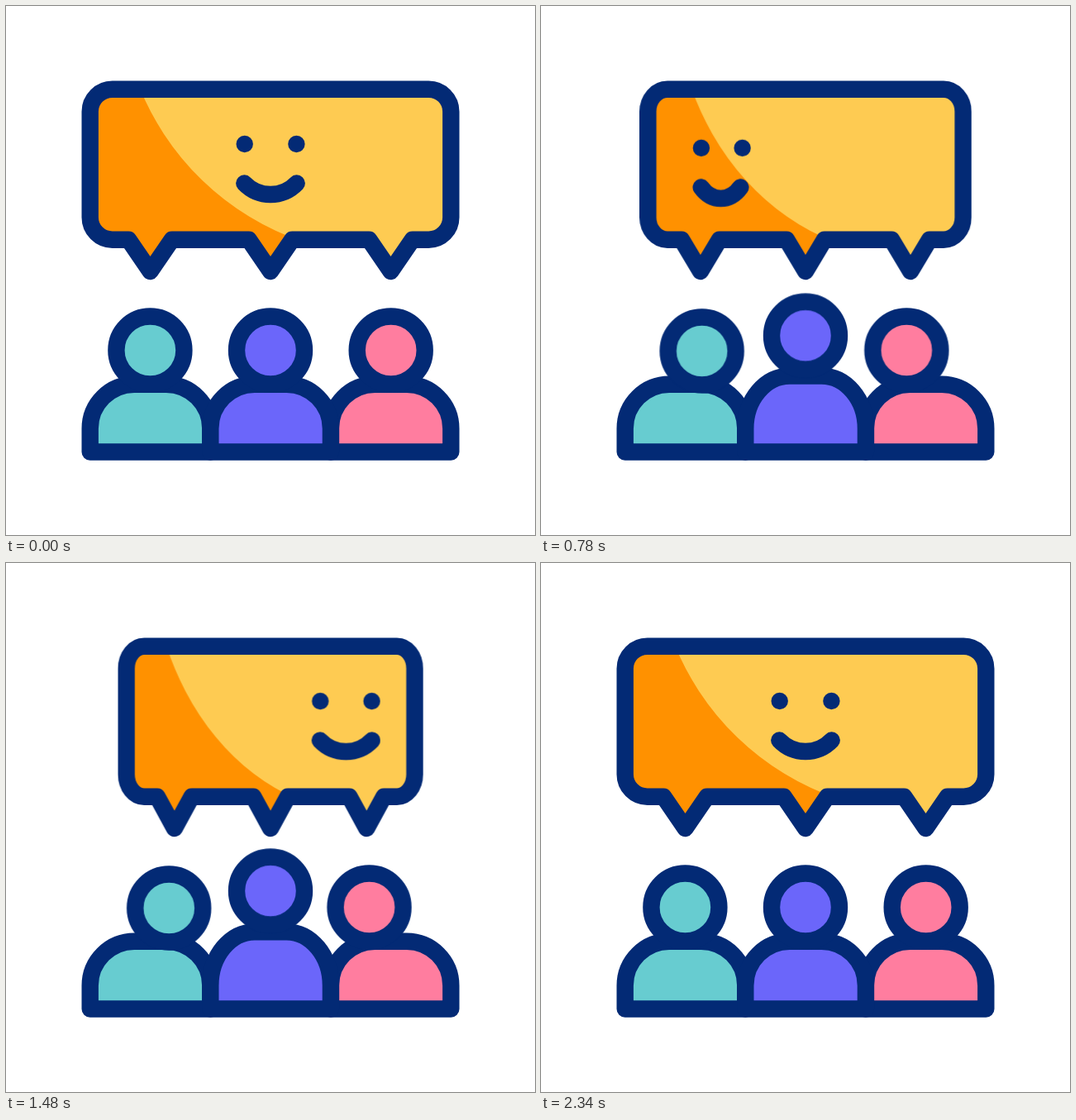
These frames come from a looping animation (640 px wide and 640 px high, 2400 ms). An HTML page:

```html
<!DOCTYPE html>
<html lang="en">
<head>
<meta charset="utf-8">
<title>Shared mood</title>
<style>
  html, body { margin: 0; width: 100%; height: 100%; overflow: hidden; background: #fff; }
  svg { display: block; width: 640px; height: 640px; }

  path, circle { vector-effect: non-scaling-stroke; }
  .line { stroke: #032a75; stroke-width: 20.4px; stroke-linecap: round; stroke-linejoin: round; }

  .bubble, .eyes, .smile, .head, .mid { animation: 2400ms infinite both; }
  .bubble, .eyes, .smile { transform-origin: 320px 0; }

  .bubble { animation-name: squeeze; }
  .eyes { animation-name: look; --dx: -110.7px; --sx: .783; }
  .smile { animation-name: look; --dx: -112px; --sx: .74; }
  .head { animation-name: lean; }
  .mid { animation-name: stretch; }

  @keyframes squeeze {
    0%, 6.46% { transform: scaleX(1); animation-timing-function: cubic-bezier(.5, 0, .767, 1); }
    48.96% { transform: scaleX(.757); animation-timing-function: cubic-bezier(.35, 0, .61, 1); }
    97.5%, 100% { transform: scaleX(1); }
  }
  @keyframes look {
    0% { transform: translate(0, 0) scaleX(1); animation-timing-function: cubic-bezier(.333, 0, .571, 1); }
    24.375% { transform: translate(var(--dx), 5px) scaleX(var(--sx)); animation-timing-function: cubic-bezier(.57, 0, .7, 1); }
    65.46% { transform: translate(98px, 0) scaleX(1); animation-timing-function: cubic-bezier(.333, 0, .667, 1); }
    97.5%, 100% { transform: translate(0, 0) scaleX(1); }
  }
  @keyframes lean {
    0% { transform: translate(0, 0); animation-timing-function: cubic-bezier(.333, 0, .667, 1); }
    48.96% { transform: translate(var(--hx), var(--hy)); animation-timing-function: cubic-bezier(.35, 0, .61, 1); }
    97.5%, 100% { transform: translate(0, 0); }
  }
  @keyframes stretch {
    0% {
      d: path("M247.3 539.5V511.2C247.3 481.7 271.3 457.7 300.8 457.7H339.4C368.9 457.7 392.9 481.7 392.9 511.2V539.5Z");
      animation-timing-function: cubic-bezier(.333, 0, .667, 1);
    }
    48.96% {
      d: path("M247.3 539.5V511.2C247.3 474.1 271.3 444 300.8 444H339.4C368.9 444 392.9 474.1 392.9 511.2V539.5Z");
      animation-timing-function: cubic-bezier(.35, 0, .61, 1);
    }
    97.5%, 100% {
      d: path("M247.3 539.5V511.2C247.3 481.7 271.3 457.7 300.8 457.7H339.4C368.9 457.7 392.9 481.7 392.9 511.2V539.5Z");
    }
  }
</style>
</head>
<body>
<svg viewBox="0 0 640 640" xmlns="http://www.w3.org/2000/svg">
  <defs>
    <path id="box" d="M128.7 100.7H511.3A27 27 0 0 1 538.3 127.7V255.7A27 27 0 0 1 511.3 282.7H491.7L465.5 321L439.3 282.7H346.2L320 321L293.8 282.7H200.7L174.5 321L148.3 282.7H128.7A27 27 0 0 1 101.7 255.7V127.7A27 27 0 0 1 128.7 100.7Z"/>
    <clipPath id="inside"><use href="#box"/></clipPath>
  </defs>

  <g class="bubble">
    <use href="#box" fill="#fecb52"/>
    <path clip-path="url(#inside)" fill="#ff9100" d="M158.2 90A327 327 0 0 0 360 285.4L346 330H90V90Z"/>
    <use href="#box" class="line" fill="none"/>
  </g>

  <g class="line" fill="none">
    <path class="eyes" d="M288.7 167h.01M351.4 167h.01"/>
    <path class="smile" d="M288.3 214.5A43.9 43.9 0 0 0 351.7 214.5"/>
  </g>

  <g class="line">
    <g fill="#67ccd0">
      <path d="M101.7 539.5V511.2C101.7 481.7 125.7 457.7 155.2 457.7H193.8C223.3 457.7 247.3 481.7 247.3 511.2V539.5Z"/>
      <circle class="head" cx="174.4" cy="416.5" r="41" style="--hx: 27.5px; --hy: 1.2px"/>
    </g>
    <g fill="#ff7d9f">
      <path d="M392.9 539.5V511.2C392.9 481.7 416.9 457.7 446.4 457.7H484.8C514.3 457.7 538.3 481.7 538.3 511.2V539.5Z"/>
      <circle class="head" cx="465.7" cy="416.5" r="41" style="--hx: -31.7px; --hy: 0px"/>
    </g>
    <g fill="#6b66fa">
      <path class="mid" d="M247.3 539.5V511.2C247.3 481.7 271.3 457.7 300.8 457.7H339.4C368.9 457.7 392.9 481.7 392.9 511.2V539.5Z"/>
      <circle class="head" cx="320" cy="416.5" r="41" style="--hx: 0px; --hy: -24px"/>
    </g>
  </g>
</svg>
</body>
</html>
```
